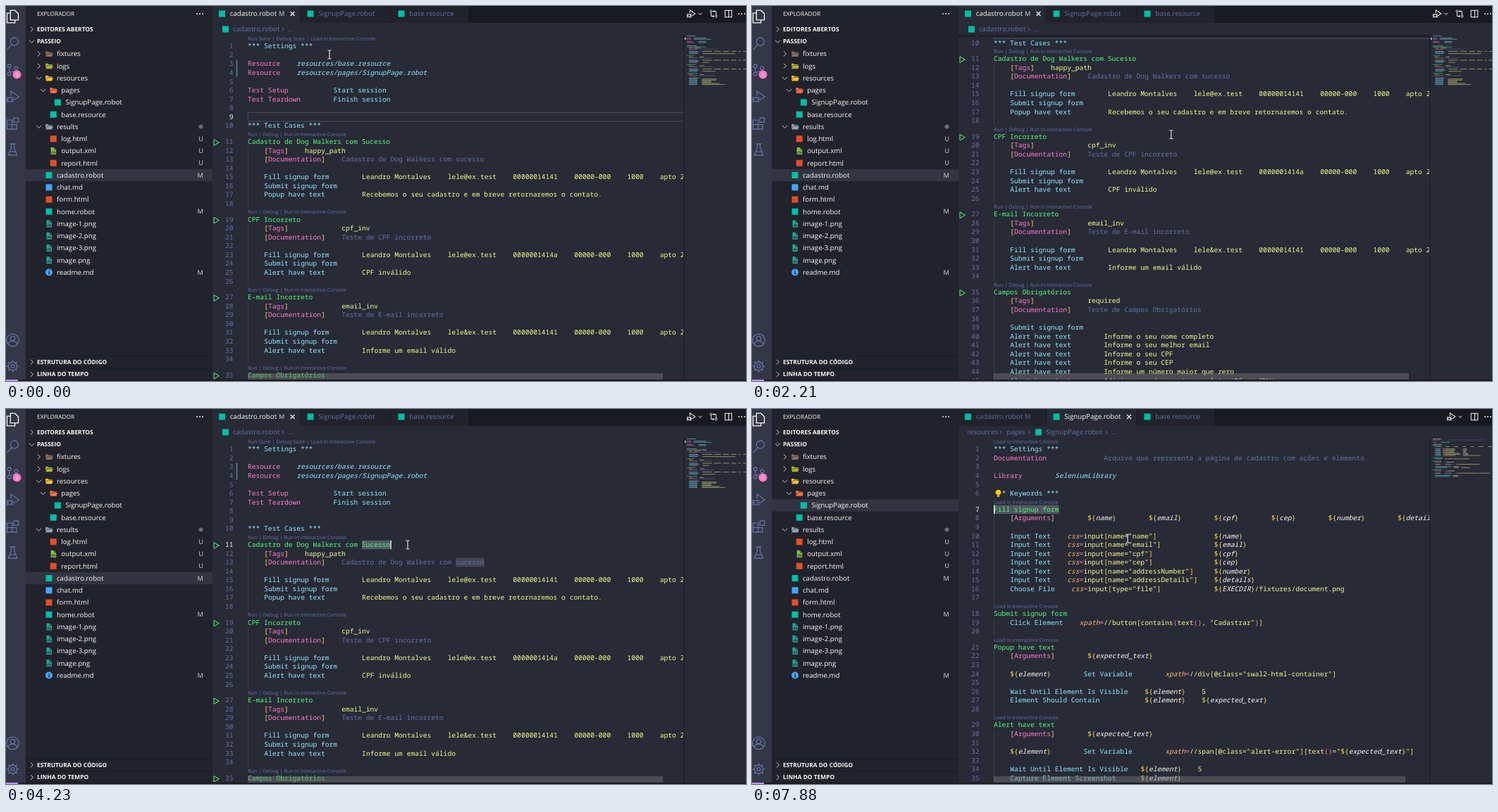
An HTML page with a canvas that plays this animation: 1050x533 px, repeating every 8000 ms.

```html
<!DOCTYPE html>
<html lang="pt">
<head>
<meta charset="utf-8">
<title>Editor</title>
<style>
html, body { margin: 0; height: 100%; overflow: hidden; background: #282a36; }
canvas { display: block; }
</style>
</head>
<body>
<canvas id="stage" width="1050" height="533"></canvas>
<script type="text/plain" id="tests">
*** Settings ***

Resource    resources/base.resource
Resource    resources/pages/SignupPage.robot

Test Setup           Start session
Test Teardown        Finish session


*** Test Cases ***
Cadastro de Dog Walkers com Sucesso
    [Tags]    happy_path
    [Documentation]    Cadastro de Dog Walkers com sucesso

    Fill signup form        Leandro Montalves    lele@ex.test    00000014141    00000-000    1000    apto 201
    Submit signup form
    Popup have text         Recebemos o seu cadastro e em breve retornaremos o contato.

CPF Incorreto
    [Tags]             cpf_inv
    [Documentation]    Teste de CPF incorreto

    Fill signup form        Leandro Montalves    lele@ex.test    0000001414a    00000-000    1000    apto 201
    Submit signup form
    Alert have text         CPF inválido

E-mail Incorreto
    [Tags]             email_inv
    [Documentation]    Teste de E-mail incorreto

    Fill signup form        Leandro Montalves    lele&ex.test    00000014141    00000-000    1000    apto 201
    Submit signup form
    Alert have text         Informe um email válido

Campos Obrigatórios
    [Tags]             required
    [Documentation]    Teste de Campos Obrigatórios

    Submit signup form
    Alert have text        Informe o seu nome completo
    Alert have text        Informe o seu melhor email
    Alert have text        Informe o seu CPF
    Alert have text        Informe o seu CEP
    Alert have text        Informe um número maior que zero
    Alert have text        Adicione um documento com foto (RG ou CNH)
</script>
<script type="text/plain" id="page">
*** Settings ***
Documentation              Arquivo que representa a página de cadastro com ações e elemento

Library        SeleniumLibrary

*** Keywords ***
Fill signup form
    [Arguments]        ${name}        ${email}        ${cpf}        ${cep}        ${number}        ${details}

    Input Text    css=input[name="name"]              ${name}
    Input Text    css=input[name="email"]             ${email}
    Input Text    css=input[name="cpf"]               ${cpf}
    Input Text    css=input[name="cep"]               ${cep}
    Input Text    css=input[name="addressNumber"]     ${number}
    Input Text    css=input[name="addressDetails"]    ${details}
    Choose File    css=input[type="file"]             ${EXECDIR}/fixtures/document.png

Submit signup form
    Click Element    xpath=//button[contains(text(), "Cadastrar")]

Popup have text
    [Arguments]        ${expected_text}

    ${element}        Set Variable        xpath=//div[@class="swal2-html-container"]

    Wait Until Element Is Visible    ${element}    5
    Element Should Contain           ${element}    ${expected_text}

Alert have text
    [Arguments]        ${expected_text}

    ${element}        Set Variable        xpath=//span[@class="alert-error"][text()="${expected_text}"]

    Wait Until Element Is Visible   ${element}    5
    Capture Element Screenshot      ${element}
</script>
<script>
const g = document.getElementById('stage').getContext('2d');
g.textRendering = 'geometricPrecision';
const WHITE = '#f8f8f2', BLUE = '#6272a4', CYAN = '#8be9fd', PINK = '#ff79c6', GREEN = '#50fa7b',
  YELLOW = '#f1fa8c', GOLD = '#ffd75a', ORANGE = '#ffb86c', TEAL = '#00bfa5', EDITOR = '#282a36', SIDE = '#21222c';
const LEFT = 343, CHAR = 5.79, ROW = 12.56, LENS = 10.1, UI = '"Open Sans", sans-serif';
const TICK = 39.3, SWITCH = 6150;

// Drawing helpers; y is the middle of the text
function put(s, x, y, color, size, style = '', family = UI) {
  g.font = `${style} ${size}px ${family}`;
  g.fillStyle = color;
  g.fillText(s, x, y + size * .35);
}
const label = (s, x, y, color = WHITE, size = 9.7) => put(s, x, y, color, size);
const mono = (s, x, y, color, style) => put(s, x, y, color, 9.65, style, '"Noto Sans Mono", monospace');
function box(x, y, w, h, color) { g.fillStyle = color; g.fillRect(x, y, w, h); }
function draw(path, x, y, scale, color, width = 1.5, fill) {
  g.save();
  g.translate(x, y);
  g.scale(scale, scale);
  const p = new Path2D(path);
  if (fill) { g.fillStyle = fill; g.fill(p); }
  g.strokeStyle = color;
  g.lineWidth = width;
  if (width) g.stroke(p);
  g.restore();
}
const ring = (x, y, r) => `M${x + r} ${y}a${r} ${r} 0 1 1-${2 * r} 0a${r} ${r} 0 1 1 ${2 * r} 0`;
function dot(x, y, r, color) { draw(ring(0, 0, r), x, y, 1, color, 0, color); }
const icon = (path, x, y, scale, color, width = 1.6) => draw(path, x - 12 * scale, y - 12 * scale, scale, color, width);
const chevron = (x, y, down, color = '#c5c8d0') => draw(down ? 'M-3.5-1.7L0 2 3.5-1.7' : 'M-1.7-3.5L2 0-1.7 3.5', x, y, 1, color, 1);
const cross = (x, y, color) => draw('M-3-3L3 3M3-3L-3 3', x, y, 1, color, 1.2);
const dots = (x, y) => [-4, 0, 4].forEach(d => dot(x + d, y, .9, WHITE));

let gear = ring(12, 12, 3) + ring(12, 12, 7.5);
for (let a = 0; a < 6.2; a += Math.PI / 4) {
  const c = Math.cos(a), s = Math.sin(a);
  gear += `M${12 + 7.5 * c} ${12 + 7.5 * s}L${12 + 11 * c} ${12 + 11 * s}`;
}
const ICONS = {
  files: 'M8 1h8l6 6v11H8zM8 6H2v17h14v-5',
  search: ring(15, 9, 7) + 'M10.5 14.5L2 23',
  branch: ring(6, 5, 3) + ring(18, 9, 3) + ring(6, 19, 3) + 'M6 8v8M18 12c0 4-8 2-11 4',
  debug: 'M9 10V2l14 10-9 6' + ring(7, 17, 4) + 'M1 12l3 3M1 22l3-3M0 17h3M11 17h3M13 12l-3 3M13 22l-3-3',
  blocks: 'M2 6h9v16H2zM2 14h17v8H2zM14 2h8v8h-8z',
  flask: 'M7 2h10M9.5 2v7L4 22h16L14.5 9V2M7 16h10',
  user: ring(12, 12, 11) + ring(12, 9, 4) + 'M4 19c2-7 14-7 16 0',
  gear,
  compare: ring(5, 5, 3) + ring(19, 19, 3) + 'M5 8v11h8l-3-3m3 3l-3 3M19 16V5h-8l3-3m-3 3l3 3',
  split: 'M3 3h18v18H3zM13 3v18'
};

// Turns text into coloured pieces per line
function parse(id) {
  let settings;
  return document.getElementById(id).textContent.split('\n').slice(1, -1).map(line => {
    const out = [], cells = [...line.matchAll(/\S+(?: \S+)*/g)];
    if (line.startsWith('***')) {
      settings = line.includes('Settings');
      return [{ text: line, col: 0, color: CYAN }];
    }
    cells.forEach(({ 0: text, index: col }, i) => {
      const head = cells[0][0], add = (color, style) => out.push({ text, col, color, style });
      if (!col) return add(settings ? PINK : GREEN);
      if (i && head.includes('Documentation')) return add(BLUE);
      if (settings) return add(CYAN, /Resource|Library/.test(head) ? 'italic' : '');
      if (text === 'Set Variable' || !i && /^[A-Z]/.test(text)) return add(CYAN);
      const base = col === 4 && text[0] === '[' ? PINK : YELLOW;
      const parts = text.match(/\$\{|^(?:css|xpath)(?==)|(?<=^css|^xpath)=|[\[\]}()]|[^$\[\](){}]+/g);
      parts.forEach((p, k) => {
        let color = base, style = '';
        if (parts[k - 1] === '${') { color = WHITE; style = 'italic'; }
        else if (/^(css|xpath)$/.test(p)) { color = ORANGE; style = 'italic'; }
        else if (/^(\$\{|[\[\]}])$/.test(p)) color = GOLD;
        else if (/^[=()]$/.test(p)) color = PINK;
        out.push({ text: p, col, color, style });
        col += p.length;
      });
    });
    return out;
  });
}
const tests = { lines: parse('tests'), lenses: [1, 11, 19, 27, 35], bar: 589 };
const page = { lines: parse('page'), lenses: [1, 7, 18, 21, 29], bar: 584 };
const rowY = (file, n) => 57 + (n - 1) * ROW + (file.lenses.filter(k => k <= n).length - 1) * LENS;

// Timeline: [time, value...] rows
const scrolls = [[0, 0], [1310, 1], [1750, 2], [2000, 3], [2980, 2], [3150, 1], [3320, 0], [7500, 1], [7800, 0]];
const mouse = [[0, 459, 69], [150, 459, 69], [480, 328, 11], [680, 345, 12], [1190, 583, 144], [1580, 583, 144],
  [2330, 597, 190], [2820, 598, 196], [3420, 600, 198], [3800, 546, 193], [4000, 546, 193], [4230, 570, 193],
  [4600, 560, 198], [4870, 560, 198], [5500, 500, 24], [5860, 493, 13], [6200, 493, 13], [6590, 518, 172],
  [6990, 533, 184], [8000, 533, 184]];
const bars = [[0, 1], [500, 1], [750, 0], [950, 0], [1080, 1], [5250, 1], [5700, 0], [6250, 0], [6400, 1], [8000, 1]];
function tween(keys, t) {
  const i = Math.max(1, keys.findIndex(k => k[0] > t)), [a, b] = [keys[i - 1], keys[i]];
  const u = (t - a[0]) / (b[0] - a[0]);
  return a.slice(1).map((v, k) => v + (b[k + 1] - v) * u);
}

const folder = (x, y, color) => draw('M-5-3.5h3.5l1.2 1.3h4.8v1.2h-7l-2 4zM-2.2-.4h8L4.2 4h-9z', x, y, 1, color, 0, color);
const sheet = (x, y, color) => {
  draw('M-3.5-5h4.5l3 3v7h-7.5z', x, y, 1, color, 0, color);
  draw('M-2.5 3l2-3 1.3 1.7 1-1 1.2 2.3zM1-5v3h3', x, y, 1, SIDE, .8);
};
const square = (x, y, color) => box(x - 4.5, y - 4.5, 9, 9, color);
const robot = (x, y) => square(x, y, TEAL);
const html = (x, y) => square(x, y, '#e44d26');
const image = (x, y) => sheet(x, y, '#26a69a');
const info = (x, y) => { dot(x, y, 5, '#42a5f5'); box(x - .6, y - 1, 1.3, 4, SIDE); box(x - .6, y - 3, 1.3, 1.2, SIDE); };
const dir = color => (x, y) => folder(x, y, color);

// name, depth, icon, status, chevron
const tree = [
  ['fixtures', 0, dir('#8d6e63'), '', 'r'], ['logs', 0, dir('#afb42b'), '', 'r'],
  ['resources', 0, dir('#fbc02d'), '', 'd'], ['pages', 1, dir('#ff7043'), '', 'd'],
  ['SignupPage.robot', 2, robot], ['base.resource', 1, robot], ['results', 0, dir('#90a4ae'), '•', 'd'],
  ['log.html', 1, html, 'U'], ['output.xml', 1, (x, y) => sheet(x, y, '#8bc34a'), 'U'], ['report.html', 1, html, 'U'],
  ['cadastro.robot', 0, robot, 'M'], ['chat.md', 0, (x, y) => square(x, y, '#42a5f5')], ['form.html', 0, html],
  ['home.robot', 0, robot, 'M'], ['image-1.png', 0, image], ['image-2.png', 0, image],
  ['image-3.png', 0, image], ['image.png', 0, image], ['readme.md', 0, info, 'M']
];

function sidebar(t) {
  box(0, 0, 28, 533, '#343746');
  const bar = { files: 15, search: 53, branch: 91, debug: 129, blocks: 167, flask: 204, user: 475, gear: 512 };
  for (const k in bar) icon(ICONS[k], 9.5, bar[k], .8, k === 'files' ? WHITE : BLUE);
  dot(15.5, 97.5, 6, PINK);
  if (t > 6350 && t < 6900) draw(ring(0, 0, 3) + 'M0-2V.3H2', 15.5, 97.5, 1, WHITE, 1.1);
  else label('6', 13.4, 97.5, WHITE, 7.2);

  box(28, 0, 265, 533, SIDE);
  label('EXPLORADOR', 44, 11, WHITE, 8.3);
  dots(275, 11);
  const heads = [['EDITORES ABERTOS', 33], ['PASSEIO', 50.5, 1], ['ESTRUTURA DO CÓDIGO', 506], ['LINHA DO TEMPO', 523.5]];
  for (const [s, y, open] of heads) {
    chevron(36.5, y, open);
    put(s, 44, y, WHITE, 8.4, 'bold');
  }
  box(28, 497, 265, 1, '#191a21');
  box(28, 514.5, 265, 1, '#191a21');
  const active = t < SWITCH ? 10 : 4;
  tree.forEach(([name, depth, pic, status, arrow], i) => {
    const y = 68 + i * 17.25, x = 61 + depth * 6.2;
    if (i === active) box(28, y - 8.6, 265, 17.2, '#323441');
    if (arrow) chevron(x - 14.5, y, arrow === 'd');
    pic(x, y);
    label(name, x + 11, y);
    if (status === '•') dot(276.5, y, 3, '#6b6d78');
    else if (status) label(status, status === 'M' ? 271.5 : 273.3, y, '#d5d6d8', 9.2);
  });
}

function header(t, first) {
  box(293, 0, 757, 24, '#191a21');
  box(293, 0, 363, 24, SIDE);
  if (first) box(293, 0, 124, 24, EDITOR); else box(417, 0, 128.5, 24, EDITOR);
  box(417, 0, 1, 24, '#191a21');
  box(545.5, 0, 1, 24, '#191a21');
  const tabs = [['cadastro.robot', 306.5, first], ['SignupPage.robot', 432, !first], ['base.resource', 561, false]];
  for (const [s, x, on] of tabs) {
    robot(x, 11);
    label(s, x + 11.2, 11, on ? WHITE : BLUE);
  }
  label('M', 387, 11, first ? '#d5d6d8' : BLUE, 9.2);
  if (first) cross(406.5, 11, WHITE);
  if (!first || t > 5500) cross(535, 11, first ? BLUE : WHITE);

  const runX = first ? 972 : 992;
  icon(ICONS.debug, runX, 11, .53, WHITE, 1.9);
  draw('M-2.5-1.2L0 1.3 2.5-1.2', runX + 13, 11, 1, WHITE, 1);
  if (first) icon(ICONS.compare, 1004, 11, .5, WHITE, 1.9);
  icon(ICONS.split, 1025, 11, .53, WHITE, 1.9);
  dots(1044, 11);

  const crumbs = first ? [['cadastro.robot', 322]] : [['resources', 305], ['pages', 361], ['SignupPage.robot', 417]];
  for (const [s, x] of crumbs) label(s, x, 33, BLUE);
  robot(first ? 311.5 : 406.5, 33);
  for (const x of first ? [393] : [353, 393, 503]) draw('M-1.2-2.5L1.3 0-1.2 2.5', x, 33, 1, BLUE, 1);
  label('...', first ? 400 : 511, 33, BLUE);
}

function minimap(file, t) {
  g.save();
  g.beginPath(); g.rect(961, 41, 89, 490); g.clip();
  box(961, 41, 1.5, 490, '#1d1e27');
  g.globalAlpha = .5;
  file.lines.forEach((line, i) => {
    for (const p of line) box(966 + p.col * .79, 42 + i * 1.57, p.text.length * .79, 1, p.color);
  });
  g.globalAlpha = 1;
  if (file === tests) {
    box(963, 45, 1.5, 3, CYAN);
    if (t > 3850 && t < 4480) box(966 + 28 * .79, 57.2, 6, 2, '#6a6d78');
  }
  g.restore();
}

function editor(t, file, scroll) {
  const first = file === tests, clicked = t > 3850;
  const current = first ? (clicked ? 11 : 9) : 7;
  const mark = (n, col, len, color) => box(LEFT + col * CHAR, rowY(file, n) - 6, len * CHAR, ROW, color);
  g.save();
  g.beginPath(); g.rect(293, 41, 668, 490); g.clip();
  g.translate(0, -scroll);

  if (!first) mark(7, 0, 16, '#4f5660');
  else if (clicked && t < 4480) {
    mark(11, 28, 7, '#555963');
    mark(13, 51, 7, '#424653');
  } else if (clicked) mark(11, 28, 7, '#3f6f60');
  if (first && !(clicked && t < 4480)) {
    g.strokeStyle = '#44475a';
    g.lineWidth = 1.3;
    g.strokeRect(LEFT + .5, rowY(file, current) - 6, 640, ROW);
  }

  const indentTop = first ? 11 : 7;
  file.lines.forEach((line, i) => {
    const n = i + 1, y = rowY(file, n), num = String(n);
    mono(num, 322.5 - num.length * CHAR, y, n === current ? WHITE : BLUE);
    if (n > indentTop && !file.lenses.includes(n)) box(LEFT, y - 6.3, 1, ROW, '#3d404f');
    for (const p of line) mono(p.text, LEFT + p.col * CHAR, y, p.color, p.style);
    if (!file.lenses.includes(n)) return;
    const lens = !first ? 'Load in Interactive Console'
      : n === 1 ? 'Run Suite | Debug Suite | Load in Interactive Console' : 'Run | Debug | Run in Interactive Console';
    label(lens, LEFT, y - 10.4, BLUE, 7.3);
    if (first && n > 1) draw('M-3-4L4.3.3-3 4.6z', 298, y + 1, 1, GREEN, 1);
  });

  if (first) for (let y = 77; y < 101; y += 2) box(326.5, y, 2, 1.2, '#62a5b8');
  else {
    box(344, 114, 11, 12, EDITOR);
    dot(349.5, 118.5, 3.8, '#ffcc00');
    box(347.8, 122, 3.4, 3, '#d9ad00');
  }
  const caret = first ? clicked && (t < 4870 || t > 5400) : t > 6990;
  if (caret) box(first ? 545.5 : LEFT, rowY(file, current) - 6, 1.3, ROW, WHITE);
  g.restore();

  if (scroll) {
    const shade = g.createLinearGradient(0, 41, 0, 46);
    shade.addColorStop(0, '#191a21');
    shade.addColorStop(1, '#191a2100');
    box(293, 41, 668, 5, shade);
  }
  g.globalAlpha = tween(bars, t)[0];
  box(LEFT, 522, file.bar, 9, 'rgba(121,121,121,.45)');
  g.globalAlpha = 1;
}

function pointer(t) {
  const [x, y] = tween(mouse, t);
  if (y < 41)
    draw('M-1.5 1c0-2 3-2 3 0v5c0-1 2.5-1 2.5.5 0-1 2.2-.8 2.2.6 0-.8 2-.6 2 .8v4c0 3-1 3-1.5 5h-6c-1-2-3.5-4-4.5-6-.5-1.5 1-2 2.3-.2z',
      x - .5, y, 1, '#000', 1, '#fff');
  else draw('M-2.5-6H-.7L0-5.3.7-6H2.5M0-5.3V5.3M-2.5 6H-.7L0 5.3.7 6H2.5', x, y, 1, '#fff', 1);
}

const start = performance.now();
function frame() {
  const t = (performance.now() - start) % 8000, first = t < SWITCH, file = first ? tests : page;
  const scroll = scrolls.filter(s => s[0] <= t).pop()[1] * TICK;
  box(0, 0, 1050, 533, EDITOR);
  editor(t, file, scroll);
  minimap(file, t);
  header(t, first);
  sidebar(t);
  box(0, 531, 1050, 2, '#191a21');
  box(0, 531, 17, 2, '#bd93f9');
  pointer(t);
  requestAnimationFrame(frame);
}
frame();
</script>
</body>
</html>
```
